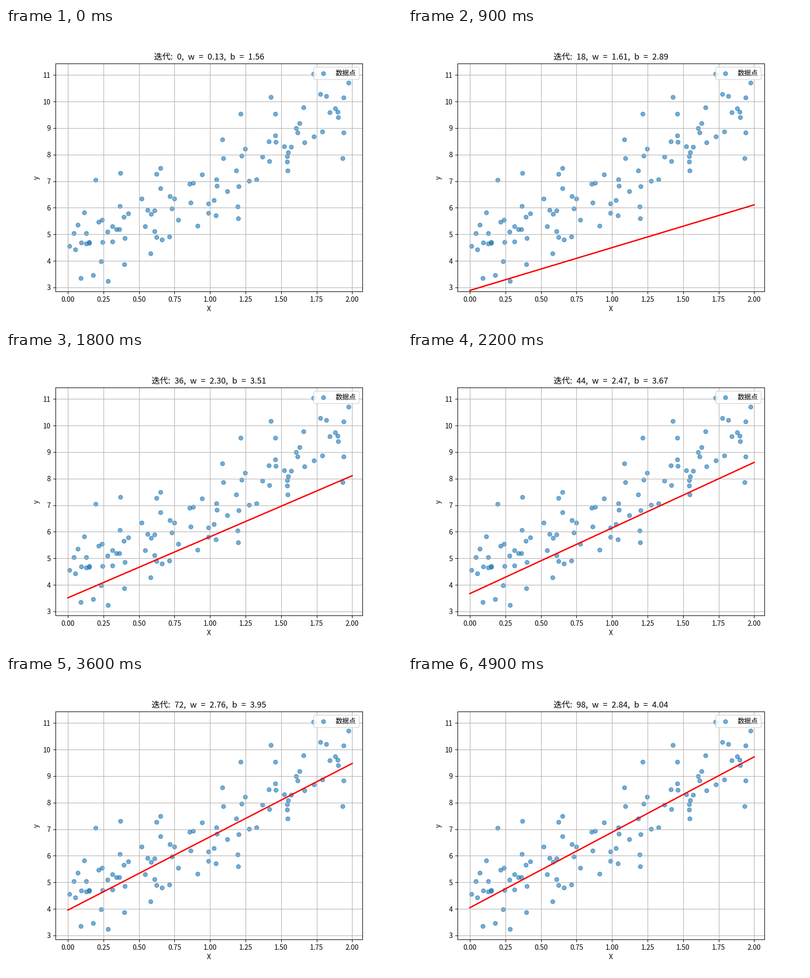
A matplotlib script that plays this animation: 800 px wide and 600 px high, repeating every 5 s.

```python
import numpy as np
import matplotlib.pyplot as plt
from matplotlib.animation import FuncAnimation

plt.rcParams["font.family"] = "Noto Sans CJK JP"

FRAMES = 50
STEPS_PER_FRAME = 2
INTERVAL_MS = 100
LEARNING_RATE = 0.01
EN_SPACE = "\u2002"

# Noisy samples of y = 4 + 3x
np.random.seed(42)
x = 2 * np.random.rand(100)
y = 4 + 3 * x + np.random.randn(100)


def descend(w, b, steps):
    """Return (w, b) after each gradient descent step on the mean squared error."""
    history = []
    for _ in range(steps):
        error = w * x + b - y
        w, b = (w - LEARNING_RATE * 2 * np.mean(error * x),
                b - LEARNING_RATE * 2 * np.mean(error))
        history.append((w, b))
    return history


history = descend(np.random.randn(), np.random.randn(), FRAMES * STEPS_PER_FRAME)

fig, ax = plt.subplots(figsize=(8, 6), dpi=100)
ax.scatter(x, y, alpha=0.6, label="数据点")
ax.set_xlim(ax.get_xlim())
ax.set_ylim(ax.get_ylim())
line, = ax.plot([], [], color="red", linewidth=2)
ax.set_xlabel("X")
ax.set_ylabel("y")
ax.grid(True)
ax.legend(loc="upper right")
title = ax.set_title("")

line_x = np.array([0, 2])


def update(frame):
    step = frame * STEPS_PER_FRAME
    w, b = history[step]
    line.set_data(line_x, w * line_x + b)
    caption = f"迭代: {step}, w = {w:.2f}, b = {b:.2f}"
    title.set_text(caption.replace(" ", EN_SPACE))
    return line, title


anim = FuncAnimation(fig, update, frames=FRAMES, init_func=lambda: update(0),
                     interval=INTERVAL_MS, repeat=True, repeat_delay=0)
plt.show()
```
